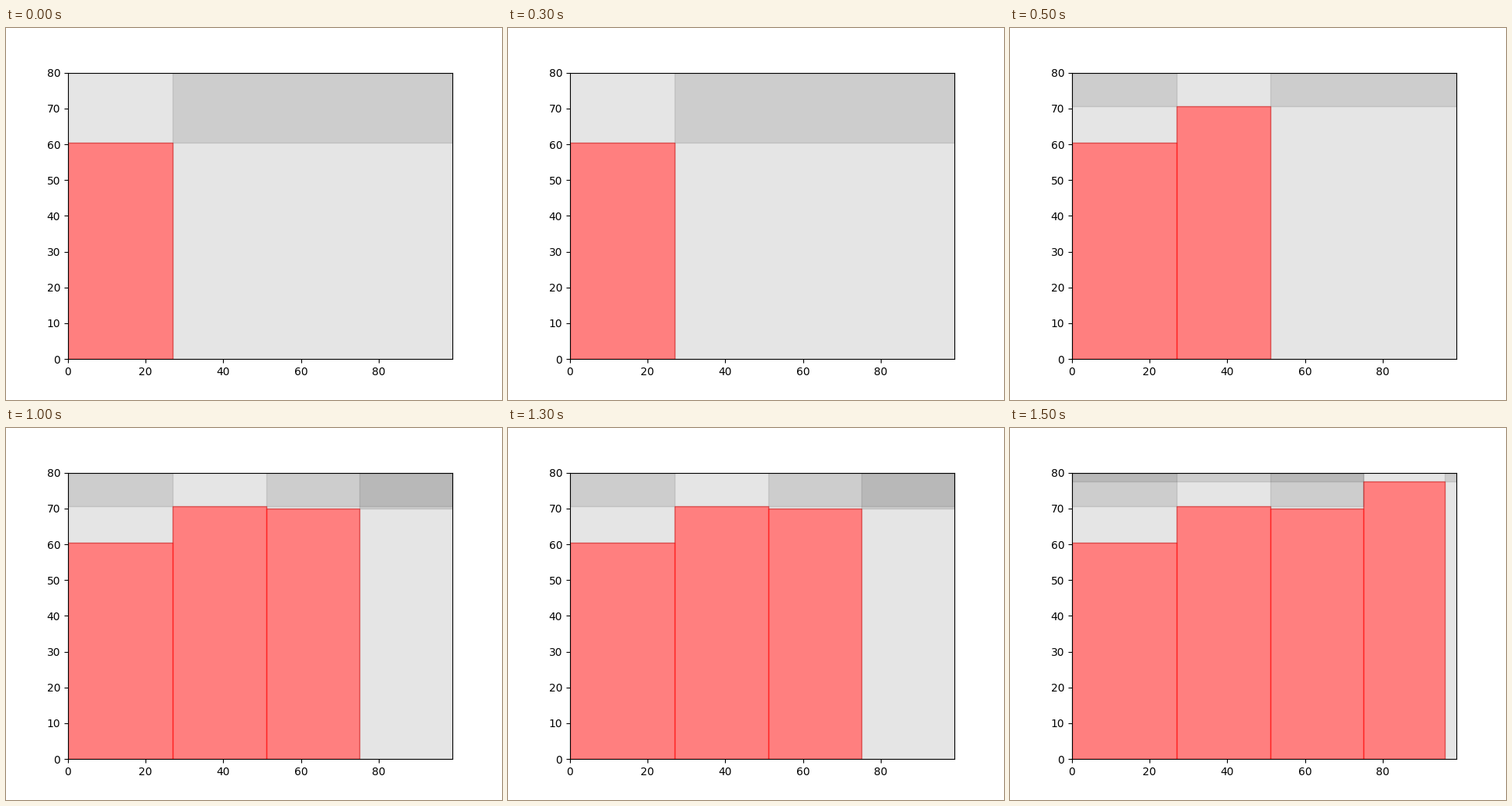
Animation, 640 px wide and 480 px high, one loop 2 s. Source, as a matplotlib script:

```python
import matplotlib.pyplot as plt
from matplotlib.animation import FuncAnimation
from matplotlib.patches import Rectangle

WIDTH, HEIGHT = 99, 80
# Each item is (width, height), placed side by side along the floor.
ITEMS = [(27, 60.4), (24, 70.6), (24, 70), (21, 77.5)]


def split(free, used):
    """Return the maximal parts of a free box left around a used one."""
    x0, y0, x1, y1 = free
    u0, v0, u1, v1 = used
    if u0 >= x1 or u1 <= x0 or v0 >= y1 or v1 <= y0:
        return [free]
    parts = [(x0, y0, u0, y1), (u1, y0, x1, y1),
             (x0, y0, x1, v0), (x0, v1, x1, y1)]
    return [p for p in parts if p[2] > p[0] and p[3] > p[1]]


def contains(a, b):
    return a[0] <= b[0] and a[1] <= b[1] and a[2] >= b[2] and a[3] >= b[3]


def pack(count):
    """Place the first items and return the used and free boxes."""
    used, free, x = [], [(0, 0, WIDTH, HEIGHT)], 0
    for w, h in ITEMS[:count]:
        box = (x, 0, x + w, h)
        used.append(box)
        parts = list(dict.fromkeys(p for f in free for p in split(f, box)))
        free = [p for p in parts
                if not any(q != p and contains(q, p) for q in parts)]
        x += w
    return used, free


def add_box(box, color, alpha):
    x0, y0, x1, y1 = box
    ax.add_patch(Rectangle((x0, y0), x1 - x0, y1 - y0,
                           color=color, alpha=alpha))


def update(step):
    for patch in list(ax.patches):
        patch.remove()
    used, free = pack(step + 1)
    for box in used:
        add_box(box, "red", 0.5)
    for box in free:
        add_box(box, "black", 0.1)
    return ax.patches


fig, ax = plt.subplots(figsize=(6.4, 4.8), dpi=100)
ax.set_xlim(0, WIDTH)
ax.set_ylim(0, HEIGHT)

anim = FuncAnimation(fig, update, frames=len(ITEMS), interval=500, repeat=True)
plt.show()
```
